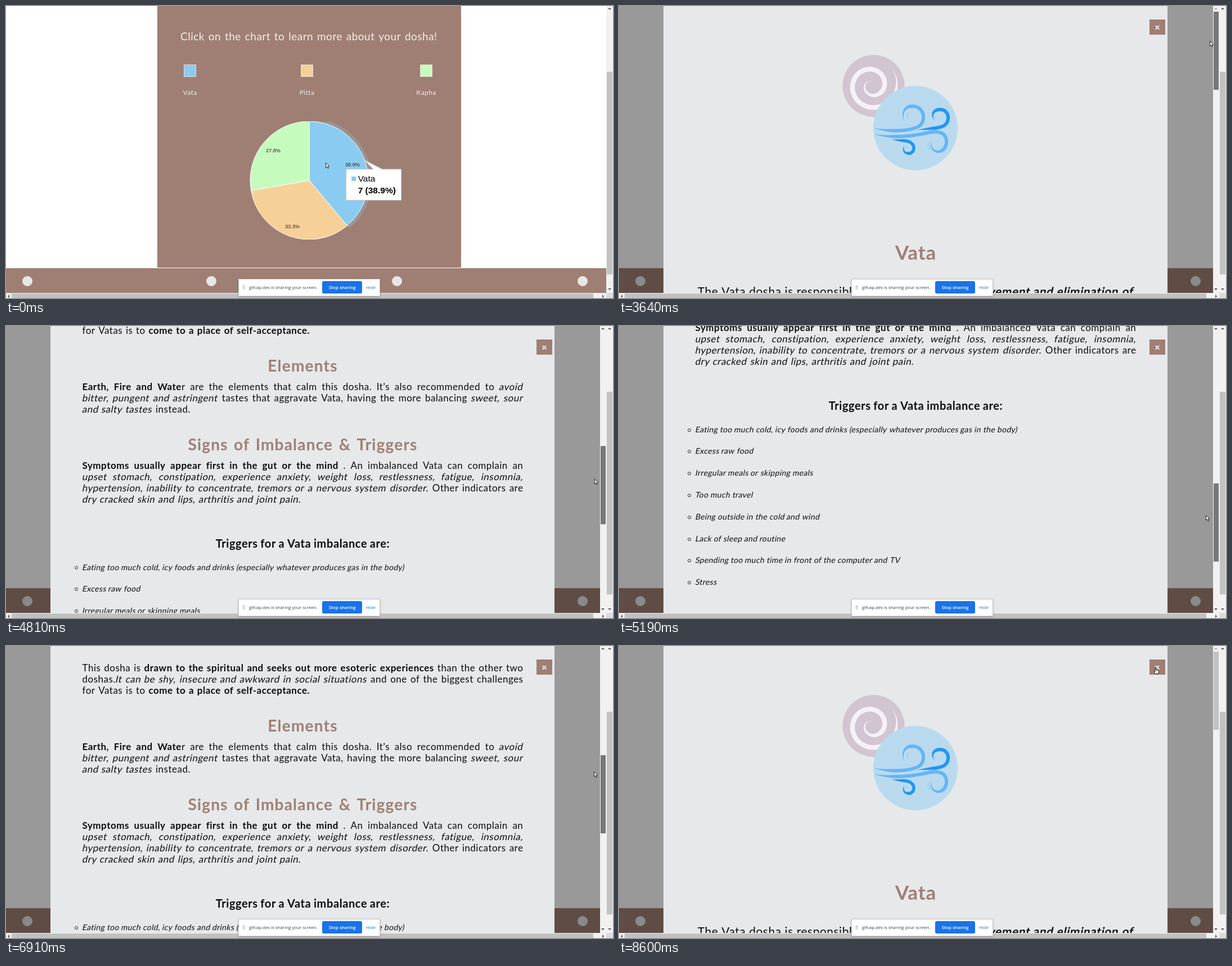
These frames come from a looping animation (1079x519 px, 8.93 s). An HTML page:

```html
<!DOCTYPE html>
<html lang="en">
<head>
<meta charset="utf-8">
<title>Dosha chart</title>
<style>
@property --scroll { syntax: "<number>"; inherits: true; initial-value: 0; }

html, body { margin: 0; width: 100%; height: 100%; overflow: hidden; background: #fff; }
body { position: relative; font-family: Lato, sans-serif; }
div, svg { position: absolute; }
svg { display: block; left: 0; top: 0; }

.brown { background: #9f7f73; }
.panel { left: 269px; top: 0; width: 540px; height: 465px; }
.footer { left: 0; top: 466px; width: 1067px; height: 44px; }
.footer div { top: 14px; width: 18px; height: 18px; border-radius: 50%; background: #e7e6e8; }

.legend { color: #efedec; font-size: 12px; line-height: 20px; letter-spacing: .4px; top: 144px; width: 60px; text-align: center; }
.legend::before { content: ""; position: absolute; left: 19px; top: -40px; width: 20px; height: 20px; background: var(--fill); border: 1px solid #e9dcd6; }

/* Text lines: words laid out in a row */
.line { display: flex; left: 135.5px; width: 784px; height: 20px; line-height: 20px; white-space: nowrap; color: #0c0c0c; }
.line .b { font-weight: 700; }
.line .i { display: inline-block; transform: skewX(-12deg); }
.title { left: 310px; color: #f0eeed; font-size: 19px; letter-spacing: .5px; gap: 6.8px; }
.text, .last { font-size: 17px; letter-spacing: .5px; gap: 5.7px; }
.text { justify-content: space-between; gap: 0; }
.intro { font-size: 21px; letter-spacing: .5px; gap: 6px; justify-content: center; }
.name { font-size: 35px; letter-spacing: .8px; justify-content: center; color: #9f7f73; }
.head { font-size: 28px; letter-spacing: 1.2px; gap: 10.4px; justify-content: center; color: #9f7f73; }
.sub { font-size: 20px; letter-spacing: .6px; gap: 4.6px; justify-content: center; }
.item { font-size: 14px; letter-spacing: .35px; gap: 3.65px; }
.item::before { content: ""; position: absolute; left: -13.5px; top: 8px; width: 4px; height: 4px; border: 1px solid #222; border-radius: 50%; }

#modal, #modal .view { left: 0; top: 0; width: 1067px; height: 510px; overflow: hidden; }
#modal .view { width: 1056px; background: rgba(0, 0, 0, .4); }
#sheet { left: 79px; top: 0; width: 896px; height: 510px; background: #e6e8ea; }
#page { left: 0; top: 0; width: 1056px; height: 1794px; transform: translateY(calc(var(--scroll) * -3.685px)); }
.close { left: 943px; top: 24px; width: 28px; height: 27px; text-align: center; color: #fff; font: 700 17px/27px Lato, sans-serif; }
.track { left: 1056px; top: 0; width: 11px; height: 510px; background: #f1f1f1; }
.thumb { left: 1px; top: 10px; width: 9px; height: 139px; transform: translateY(calc(var(--scroll) * 1px)); }
.arrow { width: 6px; height: 3px; background: #505050; }
.up { clip-path: polygon(50% 0, 100% 100%, 0 100%); }
.down { clip-path: polygon(0 0, 100% 0, 50% 100%); }
.left { width: 3px; height: 6px; clip-path: polygon(0 50%, 100% 0, 100% 100%); }
.right { width: 3px; height: 6px; clip-path: polygon(0 0, 100% 50%, 0 100%); }
.bar { background: #f1f1f1; }
.grip { background: #c1c1c1; }

.share { left: 413px; top: 485px; width: 250px; height: 29px; background: #fff; border: 1px solid #c9c9c9; box-shadow: 0 1px 3px rgba(0, 0, 0, .25); font: 7.9px/29px "Open Sans", sans-serif; color: #3c4043; white-space: nowrap; }
.handle { left: 7px; top: 10px; width: 1px; height: 8px; border: solid #b5b5b5; border-width: 0 1px; }
.stop { left: 148px; top: 3px; width: 71px; height: 22px; line-height: 22px; border-radius: 3px; background: #1a73e8; color: #fff; text-align: center; font-weight: 600; }

/* Timeline */
#modal, .thumb, .track .up, .hover, #pointer, #pointer path { animation: 8930ms linear infinite; }
#modal { animation-name: open, scroll; animation-timing-function: step-end, linear; }
.thumb { animation-name: grip; animation-timing-function: step-end; }
.track .up { animation-name: up; animation-timing-function: step-end; }
.hover { opacity: 0; animation-timing-function: step-end; }
#Vata { animation-name: vata; }
#Kapha { animation-name: kapha; }
#Pitta { animation-name: pitta; }
#pointer { animation-name: move; }
#pointer path { animation-name: arrow; animation-timing-function: step-end; }
#pointer .hand { animation-name: hand; }

@keyframes vata { 0%, 15.68% { opacity: 1; } 3.7% { opacity: 0; } }
@keyframes kapha { 0%, 9.85% { opacity: 0; } 3.7% { opacity: 1; } }
@keyframes pitta { 0%, 15.68% { opacity: 0; } 9.85% { opacity: 1; } }
@keyframes open { 0% { opacity: 0; } 21.61%, 100% { opacity: 1; } }
@keyframes grip {
  0%, 92.05%, 100% { background: #c1c1c1; }
  36.3% { background: #a8a8a8; }
  40.76% { background: #787878; }
}
@keyframes up { 0%, 88.24%, 100% { background: #a3a3a3; } 43.9% { background: #505050; } }
/* The drag rests briefly at each stop. */
@keyframes scroll {
  0%, 43.78% { --scroll: 0; }
  49.25%, 50.05% { --scroll: 143.3; }
  58.1%, 59% { --scroll: 269.7; animation-timing-function: cubic-bezier(.3, .5, .6, 1); }
  65.5% { --scroll: 350; animation-timing-function: cubic-bezier(.4, 0, .7, .5); }
  77.35%, 78.15% { --scroll: 184; }
  84.63%, 85.1% { --scroll: 39.6; }
  88.24%, 100% { --scroll: 0; }
}
@keyframes move {
  0%, 2.8% { transform: translate(568px, 278px); }
  4.59%, 8.17% { transform: translate(505px, 270px); }
  11.53%, 14.33% { transform: translate(525px, 350px); }
  17.02%, 30.8% { transform: translate(564px, 307px); animation-timing-function: ease-in-out; }
  36.95%, 43.78% { transform: translate(1050px, 62px); animation-timing-function: linear; }
  49.25%, 50.05% { transform: translate(1048px, 213px); }
  58.1%, 59% { transform: translate(1043px, 336px); animation-timing-function: cubic-bezier(.3, .5, .6, 1); }
  65.5% { transform: translate(1044px, 410px); animation-timing-function: cubic-bezier(.4, 0, .7, .5); }
  77.35%, 78.15% { transform: translate(1045px, 223px); }
  84.63%, 85.1% { transform: translate(1051px, 85px); }
  88.24%, 92.05% { transform: translate(1051px, 58px); }
  96.3%, 100% { transform: translate(954px, 38px); }
}
@keyframes arrow { 0% { opacity: 1; } 95.6%, 100% { opacity: 0; } }
@keyframes hand { 0% { opacity: 0; } 95.6%, 100% { opacity: 1; } }
</style>
</head>
<body>
<div class="panel brown"></div>
<div id="intro"></div>
<div class="legend" style="left:297px;--fill:#8acbf2">Vata</div>
<div class="legend" style="left:505px;--fill:#f7d097">Pitta</div>
<div class="legend" style="left:717px;--fill:#c5fcbd">Kapha</div>
<svg id="chart" style="left:393px;top:205px" width="320" height="210" viewBox="393 205 320 210" font-family="Liberation Sans, Arial, sans-serif"></svg>
<div class="footer brown">
  <div style="left:29px"></div><div style="left:356px"></div><div style="left:686px"></div><div style="left:1016px"></div>
</div>

<div id="modal">
  <div class="view">
    <div id="sheet"></div>
    <div id="page">
      <svg id="art" width="1056" height="400">
        <circle cx="452.5" cy="142" r="55" fill="#d0c5d0"/>
      </svg>
    </div>
    <div class="close brown">×</div>
  </div>
  <div class="track">
    <div class="arrow up" style="left:2px;top:3px"></div>
    <div class="thumb"></div>
    <div class="arrow down" style="left:2px;top:502px"></div>
  </div>
</div>

<div class="bar" style="left:1067px;top:0;width:12px;height:510px">
  <div class="arrow up" style="left:3px;top:3px"></div>
  <div class="grip" style="left:1px;top:117px;width:10px;height:360px"></div>
  <div class="arrow down" style="left:3px;top:502px"></div>
</div>
<div class="bar" style="left:0;top:510px;width:1067px;height:9px">
  <div class="arrow left" style="left:3px;top:3px"></div>
  <div class="grip" style="left:10px;top:1px;width:1034px;height:8px"></div>
  <div class="arrow right" style="left:1060px;top:3px"></div>
</div>
<div style="left:1067px;top:510px;width:12px;height:9px;background:#dcdcdc"></div>

<div class="share">
  <div class="handle"></div>
  <div style="left:18px">gifcap.dev is sharing your screen.</div>
  <div class="stop">Stop sharing</div>
  <div style="left:226px;color:#1a73e8">Hide</div>
</div>

<svg id="pointer" width="14" height="16" overflow="visible" fill="#fff" stroke="#111" stroke-width=".9" stroke-linejoin="round">
  <path d="M.5 .5V9.2L2.5 7.4L4 10.6L5.4 10L4 6.9H6.6Z"/>
  <path class="hand" d="M-.8 1Q0 -.2 .9 1V4.6L4.4 5.3Q5.4 5.7 5.2 7L4.5 11.5H-.6L-3 7.5Q-2.6 6.2 -.8 7.5Z"/>
</svg>

<script>
const $ = id => document.getElementById(id);

// "*" toggles bold, "_" toggles slant; both carry over to the next line.
const on = { '*': false, _: false };
const piece = s => {
  if (s in on) { on[s] = !on[s]; return ''; }
  return s && `<span class="${on['*'] ? 'b ' : ''}${on._ ? 'i' : ''}">${s}</span>`;
};
const word = w => `<span>${w.split(/([*_])/).map(piece).join('')}</span>`;
function line(parent, kind, y, text) {
  const html = text.replace('&', '&amp;').split(' ').map(word).join('');
  parent.insertAdjacentHTML('beforeend', `<div class="line ${kind}" style="top:${y - 10}px">${html}</div>`);
}
function paragraph(y, ...lines) {
  lines.forEach((text, i) => line($('page'), i < lines.length - 1 ? 'text' : 'last', y + i * 20.2, text));
}

line($('intro'), 'title', 54, 'Click on the chart to learn more about your dosha!');

const page = $('page');
line(page, 'name', 437, '*Vata*');
line(page, 'intro', 507, 'The Vata dosha is responsible for *_communication, movement and elimination of');
line(page, 'intro', 541, 'all wastes_* from the body.');
paragraph(602,
  'Vata types find it _hard to sit still_ and have _wild imaginations._ They may be more fearful ad',
  'anxious of everyday things than others and tend to be light sleepers._Vatas suffer under stress and',
  'are greatly affected by the moods of those around them._ When things get overwhelming for',
  'them, *they may just drift off into their minds* where things are more comfortable for them.');
paragraph(716.5,
  'This dosha is *drawn to the spiritual and seeks out more esoteric experiences* than the other two',
  'doshas._It can be shy, insecure and awkward in social situations_ and one of the biggest challenges',
  'for Vatas is to *come to a place of self-acceptance.*');
line(page, 'head', 818.5, '*Elements*');
paragraph(856.5,
  "*Earth, Fire and Wate*r are the elements that calm this dosha. It's also recommended to _avoid",
  'bitter, pungent and astringent_ tastes that aggravate Vata, having the more balancing _sweet, sour',
  'and salty tastes_ instead.');
line(page, 'head', 958.5, '*Signs of Imbalance & Triggers*');
paragraph(996.5,
  '*Symptoms usually appear first in the gut or the mind* . An imbalanced Vata can complain an',
  '_upset stomach, constipation, experience anxiety, weight loss, restlessness, fatigue, insomnia,',
  'hypertension, inability to concentrate, tremors or a nervous system disorder._ Other indicators are',
  '_dry cracked skin and lips, arthritis and joint pain._');
line(page, 'sub', 1135, '*Triggers for a Vata imbalance are:*');
[
  'Eating too much cold, icy foods and drinks (especially whatever produces gas in the body)',
  'Excess raw food',
  'Irregular meals or skipping meals',
  'Too much travel',
  'Being outside in the cold and wind',
  'Lack of sleep and routine',
  'Spending too much time in front of the computer and TV',
  'Stress'
].forEach((text, i) => line(page, 'item', 1177.5 + i * 38.8, `_${text}_`));

// Pie chart: angles run clockwise from the top.
const polar = (deg, r) => {
  const a = deg * Math.PI / 180;
  return [539 + r * Math.sin(a), 310 - r * Math.cos(a)];
};
const arc = (from, to, r) => `${polar(from, r)}A${r} ${r} 0 0 1 ${polar(to, r)}`;
const slices = [
  { name: 'Vata', count: 7, share: '38.9%', from: 0, to: 140, fill: '#8acbf2', label: [616, 282], side: 1, drop: 16 },
  { name: 'Pitta', count: 6, share: '33.3%', from: 140, to: 260, fill: '#f7d097', label: [509, 392], side: -1, drop: -71 },
  { name: 'Kapha', count: 5, share: '27.8%', from: 260, to: 360, fill: '#c5fcbd', label: [475, 257], side: -1, drop: 16 }
];
const wedge = s => `
  <path d="M539 310L${arc(s.from, s.to, 105)}Z" fill="${s.fill}" stroke="#fff"/>
  <text x="${s.label[0]}" y="${s.label[1] + 3.3}" font-size="9.2" text-anchor="middle" fill="#222">${s.share}</text>`;
function hover(s) {
  const [tx, ty] = polar((s.from + s.to) / 2, 105);
  const x = tx - (s.side > 0 ? 33 : 65), y = ty + s.drop;
  const foot = [tx + s.side * 15, tx + s.side * 31];
  const edge = s.drop > 0 ? y : y + 55;
  const inner = s.drop > 0 ? y + 1 : y + 54;
  return `<g id="${s.name}" class="hover">
    <path d="M${arc(s.from, s.to, 108.5)}" fill="none" stroke="${s.fill}" stroke-width="5" opacity=".3"/>
    <rect x="${x + 1}" y="${y + 1}" width="98" height="55" fill="#000" opacity=".12"/>
    <rect x="${x}" y="${y}" width="98" height="55" fill="#fff" stroke="#ccc"/>
    <path d="M${foot[0]} ${edge}L${tx} ${ty}L${foot[1]} ${edge}" fill="#fff" stroke="#ccc"/>
    <path d="M${foot[0]} ${edge}V${inner}H${foot[1]}V${edge}Z" fill="#fff"/>
    <rect x="${x + 9.5}" y="${y + 13}" width="8" height="8" fill="${s.fill}"/>
    <g font-size="15.5"><text x="${x + 21}" y="${y + 22}">${s.name}</text>
    <text x="${x + 21}" y="${y + 42.5}" font-weight="700">${s.count} (${s.share})</text></g>
  </g>`;
}
$('chart').innerHTML = slices.map(wedge).join('') + slices.map(hover).join('');

// Brush stroke along a path, thinning at both ends.
const art = $('art');
function shape(tag, attrs) {
  const el = document.createElementNS('http://www.w3.org/2000/svg', tag);
  for (const key in attrs) el.setAttribute(key, attrs[key]);
  return el;
}
function brush(d, fill, width, head, tail) {
  const path = shape('path', { d }), length = path.getTotalLength(), steps = 120;
  const outer = [], inner = [];
  for (let i = 0; i <= steps; i++) {
    const s = i / steps;
    const a = path.getPointAtLength(s * length - .5), b = path.getPointAtLength(s * length + .5);
    const dx = b.x - a.x, dy = b.y - a.y;
    const k = width / 2 * Math.min(1, s / head, (1 - s) / tail) / Math.hypot(dx, dy);
    const x = (a.x + b.x) / 2, y = (a.y + b.y) / 2;
    outer.push([x - dy * k, y + dx * k]);
    inner.unshift([x + dy * k, y - dx * k]);
  }
  art.append(shape('polygon', { points: outer.concat(inner).join(' '), fill }));
}

const spiral = Array.from({ length: 85 }, (_, i) => {
  const a = (i * 8 - 38) * Math.PI / 180, r = 47 - i * .48;
  return [449 + r * Math.cos(a), 141 + r * Math.sin(a)];
});
brush('M' + spiral.join('L'), '#f5f1f6', 8.5, .25, .2);
art.append(shape('circle', { cx: 527, cy: 217, r: 75, fill: '#b9daee' }));

const pale = '#98cdf3', light = '#64b5f6', strong = '#2196f3';
brush('M519 187C511 189 511 198 515 205', pale, 1.8, .3, .3);
brush('M554 237C547 243 548 254 557 258', pale, 1.8, .3, .3);
brush('M453 217C480 224 520 223 534 213C545 205 545 180 522 178C505 178 502 194 507 204', light, 6, .2, .2);
brush('M453 227C485 237 530 230 550 225C575 220 583 230 582 243C580 260 563 264 556 252C553 246 555 241 558 238', light, 6, .2, .2);
brush('M530 221C545 217 565 219 577 213C590 206 587 184 571 184C557 184 554 196 562 203', strong, 6, .25, .2);
brush('M485 237C500 240 512 238 519 243C528 250 524 262 515 262C506 262 504 255 507 248', strong, 5.5, .25, .25);
</script>
</body>
</html>
```
